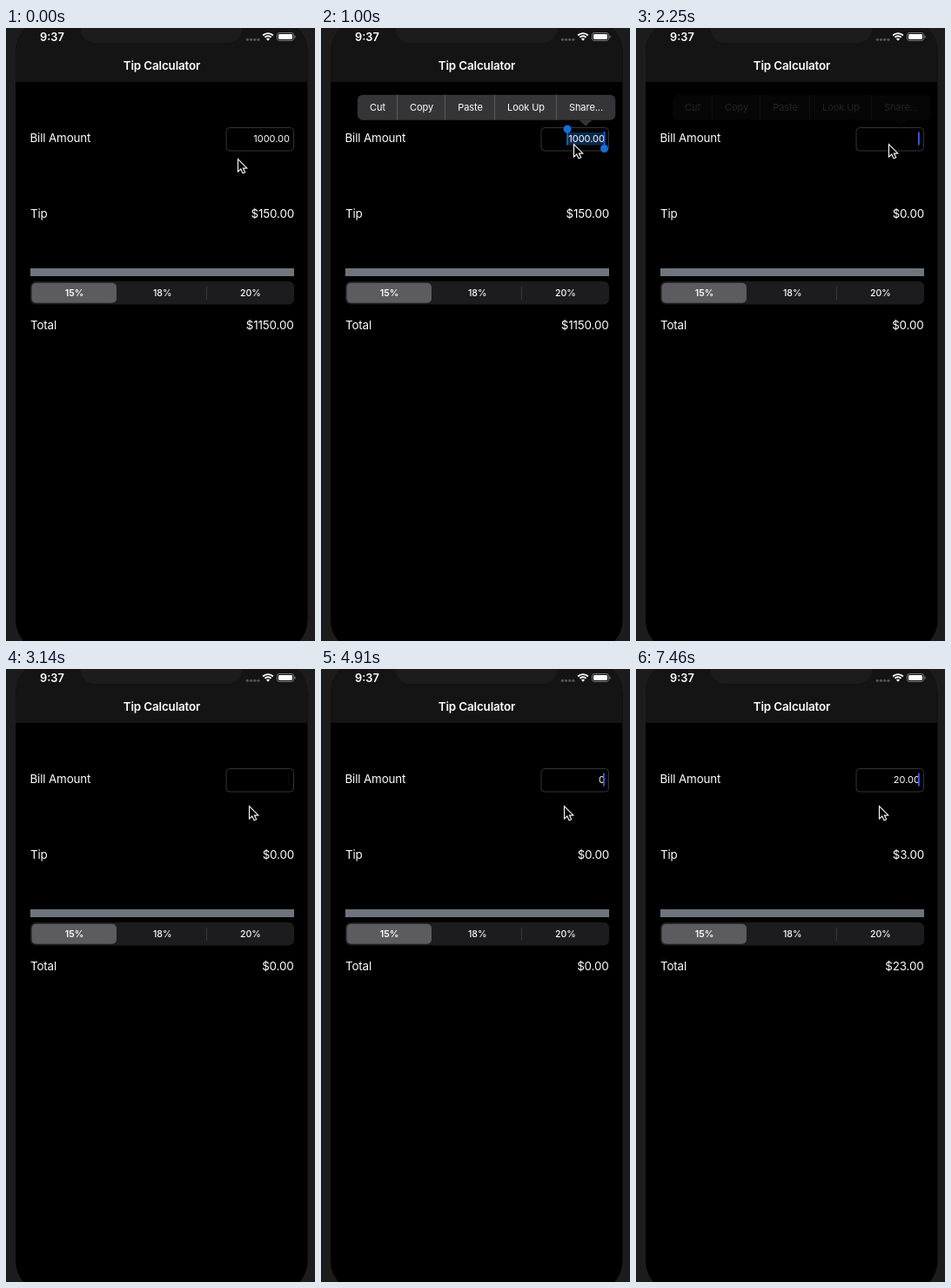
These frames come from a looping animation (355x704 px, 7990 ms). An HTML page with a canvas:

```html
<!DOCTYPE html>
<html lang="en">
<head>
<meta charset="utf-8">
<title>Tip Calculator</title>
<style>
html, body { margin: 0; width: 100%; height: 100%; overflow: hidden; background: #1c1c1d; }
canvas { display: block; width: 355px; height: 704px; }
</style>
</head>
<body>
<canvas id="stage"></canvas>
<script>
const W = 355, H = 704, LOOP = 7990;
const canvas = document.getElementById('stage');
const dpr = window.devicePixelRatio || 1;
canvas.width = W * dpr;
canvas.height = H * dpr;
const ctx = canvas.getContext('2d');
ctx.scale(dpr, dpr);

const BEZEL = '#1c1c1d', NAV = '#141415', CARET = '#3c5ee8', HANDLE = '#146fdc';

// Each track is a list of [start ms, value]; values hold until the next entry.
const billTrack = [[0, '1000.00'], [2130, ''], [3780, '0'], [5210, ''], [6330, '2'],
  [6500, '20'], [6800, '20.'], [7280, '20.0'], [7460, '20.00']];
const caretTrack = [[0, 0], [290, 1],
  ...fadeOut(2670), ...fadeIn(3140), [3670, .75], [3725, .5], [3780, 1],
  ...fadeOut(4320), ...fadeIn(4790), ...fadeOut(5750), ...fadeIn(6210)];
const selectMenuTrack = [[0, 0], [760, .28], [820, .65], [880, .3], [940, 0]];
const editMenuTrack = [[0, 0], [880, .25], [940, .65], [1000, 1],
  [2130, .75], [2190, .4], [2250, .12], [2300, 0]];
const moveIn = [[0, 0], [60, .15], [120, .45], [170, .75], [230, 1]];
const moveOut = [[0, 0], [2540, .2], [2600, .55], [2660, .85], [2720, 1]];

function fadeOut(t) { return [[t, .75], [t + 56, .5], [t + 112, .25], [t + 168, 0]]; }
function fadeIn(t) { return [[t, .08], [t + 55, .5], [t + 115, 1]]; }

function at(track, t) {
  let value = track[0][1];
  for (const [start, v] of track) if (t >= start) value = v;
  return value;
}

function text(str, x, y, { size = 13.4, weight = 400, align = 'left', color = '#fff', gap = 0 } = {}) {
  ctx.font = `${weight} ${size}px Inter, "Liberation Sans", sans-serif`;
  ctx.letterSpacing = gap + 'px';
  ctx.textAlign = align;
  ctx.fillStyle = color;
  ctx.fillText(str, x, y);
}

function box(x, y, w, h, color, r = 0) {
  ctx.fillStyle = color;
  ctx.beginPath();
  ctx.roundRect(x, y, w, h, r);
  ctx.fill();
}

function dot(x, y, r, color) {
  ctx.fillStyle = color;
  ctx.beginPath();
  ctx.arc(x, y, r, 0, Math.PI * 2);
  ctx.fill();
}

function poly(points, fill) {
  ctx.beginPath();
  points.forEach(([x, y]) => ctx.lineTo(x, y));
  ctx.closePath();
  ctx.fillStyle = fill;
  ctx.fill();
}

function drawPhone() {
  box(0, 0, W, H, BEZEL);
  ctx.save();
  ctx.beginPath();
  ctx.roundRect(11, -9, 335.5, 725, 36);
  ctx.clip();
  box(11, -9, 336, 725, '#000');
  box(11, -9, 336, 71, NAV);
  ctx.restore();
  box(85.5, -20, 186, 37, BEZEL, [0, 0, 17, 17]);
}

function drawStatus() {
  text('9:37', 39, 14.5, { size: 12.8, weight: 600 });
  for (let i = 0; i < 4; i++) dot(277.3 + i * 4.2, 13.3, 1.6, '#545456');

  ctx.strokeStyle = '#fff';
  ctx.lineWidth = 1.9;
  for (const r of [8.2, 5]) {
    ctx.beginPath();
    ctx.arc(301, 14.3, r, -Math.PI * .75, -Math.PI * .25);
    ctx.stroke();
  }
  poly([[301, 14.7], [298.9, 12.4], [301, 11.5], [303.1, 12.4]], '#fff');

  ctx.strokeStyle = '#77777a';
  ctx.lineWidth = 1;
  ctx.beginPath();
  ctx.roundRect(311.5, 5.5, 19, 9, 2.6);
  ctx.stroke();
  box(313, 7, 16, 6, '#fff', 1.4);
  box(331.4, 8.5, 1.2, 3, '#77777a', .6);
}

function drawForm(bill) {
  const tip = bill * .15;
  const money = v => '$' + v.toFixed(2);
  const label = { gap: -.15 };
  const amount = { gap: -.15, align: 'right' };
  text('Tip Calculator', 179, 48.3, { weight: 600, align: 'center', gap: -.13 });
  text('Bill Amount', 27.5, 131.2, label);
  text('Tip', 28, 218, label);
  text(money(tip), 331, 218, amount);
  text('Total', 28, 346, label);
  text(money(Number(bill) + tip), 330.5, 346, amount);

  box(28, 276, 303, 9, '#6f757c');
  box(28, 291, 303, 26.5, '#1c1c1e', 6);
  box(29.5, 292.7, 97.5, 23, '#5b5b60', 5);
  box(230, 297, 1, 15, '#3a3a3d');
  ['15%', '18%', '20%'].forEach((s, i) =>
    text(s, 78.5 + i * 101.2, 308, { size: 10.6, weight: i ? 500 : 600, align: 'center' }));
}

function drawField(t, bill) {
  const selected = t >= 880 && t < 2130;
  ctx.strokeStyle = '#343436';
  ctx.lineWidth = 1;
  ctx.beginPath();
  ctx.roundRect(253, 114.5, 77.5, 26.5, 4);
  ctx.stroke();
  if (selected) box(283, 120, 43, 14.5, '#0c2a4b');
  text(bill, 326, 131.3, { size: 11, align: 'right' });
  if (selected) {
    box(282.2, 119, 1.6, 15.5, HANDLE);
    box(324.8, 119, 1.6, 18, HANDLE);
    dot(283, 116, 4.5, HANDLE);
    dot(325.5, 138.5, 4.5, HANDLE);
  } else {
    ctx.globalAlpha = at(caretTrack, t);
    box(t < 530 ? 307.6 : 324, 119.5, 1.8, 15, CARET);
    ctx.globalAlpha = 1;
  }
}

function drawMenu(alpha, x, y, arrow, items, dividers) {
  if (!alpha) return;
  ctx.globalAlpha = alpha;
  box(x, y, 338.3 - x, 29, '#353537', 6);
  poly([[arrow - 7.5, y + 29], [arrow + 7.5, y + 29], [arrow, y + 36]], '#353537');
  dividers.forEach(d => box(d, y, 1, 29, '#5a5a5c'));
  items.forEach(([s, cx]) => text(s, cx, y + 18.6, { size: 11, align: 'center', gap: -.06 }));
  ctx.globalAlpha = 1;
}

function drawPointer(t) {
  const a = at(moveIn, t), b = at(moveOut, t);
  ctx.save();
  ctx.translate(266.5 + 24 * a - 11 * b, 150.5 - 17 * a + 24 * b);
  poly([[0, 0], [0, 14.6], [3.3, 11.5], [5.6, 16.4], [8.2, 15.3], [5.9, 10.6], [10.3, 10.4]], '#000');
  ctx.strokeStyle = '#fff';
  ctx.lineWidth = 1.1;
  ctx.stroke();
  ctx.restore();
}

function draw(t) {
  const bill = at(billTrack, t);
  drawPhone();
  drawStatus();
  drawForm(bill);
  drawField(t, bill);
  drawMenu(at(selectMenuTrack, t), 144, 76, 323,
    [['Select', 174.5], ['Select All', 243], ['Paste', 310]], [204, 281]);
  drawMenu(at(editMenuTrack, t), 42, 76.7, 304,
    [['Cut', 65], ['Copy', 115.5], ['Paste', 171.5], ['Look Up', 235.5], ['Share...', 304.5]],
    [87, 142, 199, 270]);
  drawPointer(t);
}

const start = performance.now();
function tick() {
  draw((performance.now() - start) % LOOP);
  requestAnimationFrame(tick);
}
tick();
</script>
</body>
</html>
```
